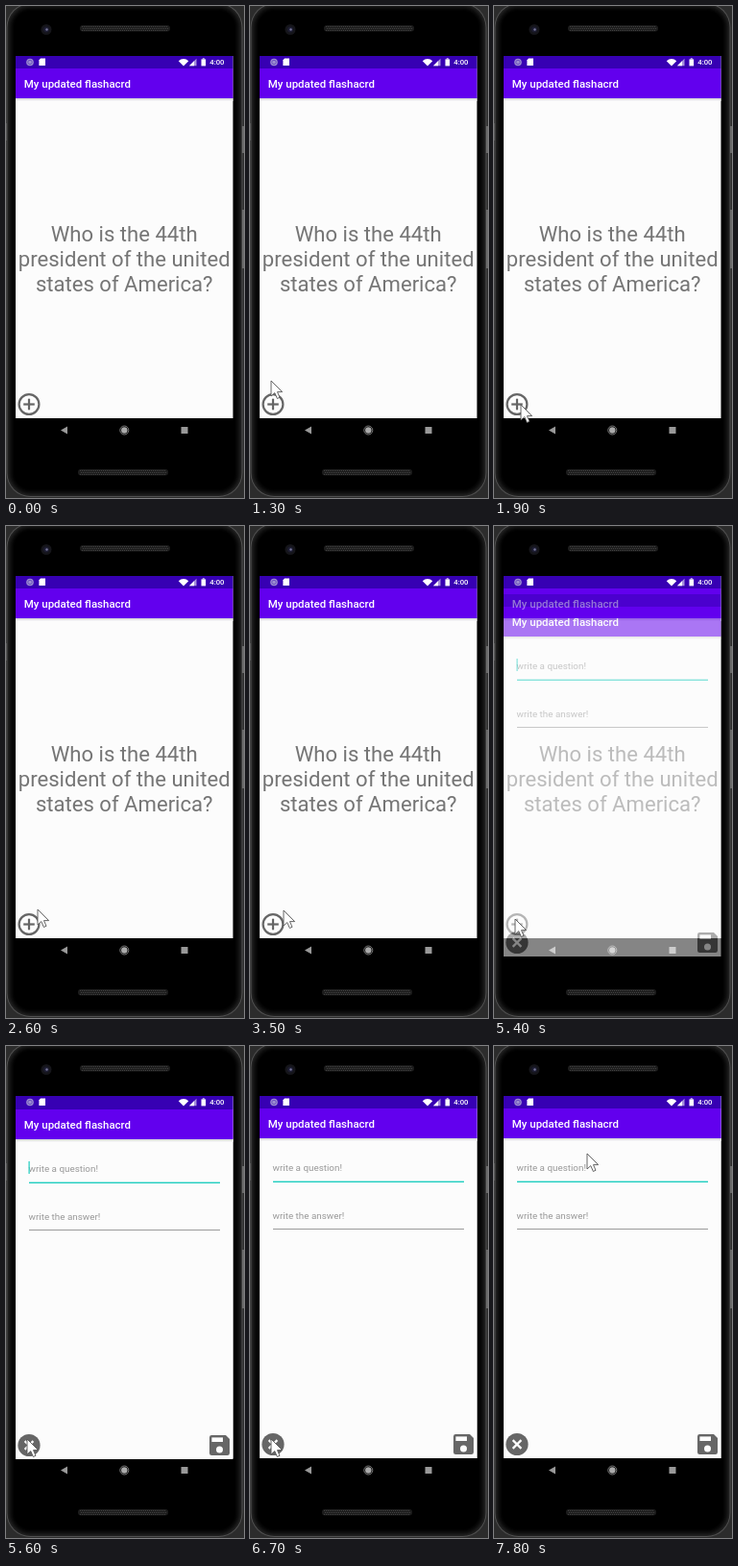
Write an HTML page with a canvas that moves like this. It is 248 px wide and 512 px high and loops after 8 s.

```html
<!DOCTYPE html>
<html lang="en">
<head>
<meta charset="utf-8">
<title>Flashcard app</title>
<style>
html, body { margin: 0; width: 100%; height: 100%; overflow: hidden; background: #000; }
canvas { display: block; width: 248px; height: 512px; }
</style>
</head>
<body>
<canvas id="stage" width="248" height="512"></canvas>
<script>
const W = 248, H = 512, LOOP = 8000, STEP = 100;
const SCREEN = { x: 10, y: 52, w: 226.5, h: 377 };
const GREY = '#666';
const stage = document.getElementById('stage').getContext('2d');

function makeLayer(paint) {
  const canvas = document.createElement('canvas');
  canvas.width = W;
  canvas.height = H;
  paint(canvas.getContext('2d'));
  return canvas;
}

function rect(c, x, y, w, h, color) {
  c.fillStyle = color;
  c.fillRect(x, y, w, h);
}

function disc(c, x, y, r, color) {
  c.fillStyle = color;
  c.beginPath();
  c.arc(x, y, r, 0, Math.PI * 2);
  c.fill();
}

function ring(c, x, y, r, width, color) {
  c.strokeStyle = color;
  c.lineWidth = width;
  c.beginPath();
  c.arc(x, y, r, 0, Math.PI * 2);
  c.stroke();
}

function pill(c, x, y, w, h, r, fill) {
  c.beginPath();
  c.roundRect(x, y, w, h, r);
  c.fillStyle = fill;
  c.fill();
}

function polygon(c, points, color) {
  c.beginPath();
  points.forEach(([x, y]) => c.lineTo(x, y));
  c.closePath();
  c.fillStyle = color;
  c.fill();
}

function line(c, x1, y1, x2, y2, width, color) {
  c.strokeStyle = color;
  c.lineWidth = width;
  c.beginPath();
  c.moveTo(x1, y1);
  c.lineTo(x2, y2);
  c.stroke();
}

function text(c, string, x, y, size, color, weight = 400, align = 'left') {
  c.font = `${weight} ${size}px Roboto, sans-serif`;
  c.textAlign = align;
  c.fillStyle = color;
  c.fillText(string, x, y);
}

function speaker(c, x, y) {
  pill(c, x, y, 94, 6.5, 3, '#1c1c1c');
  for (let row = 0; row < 3; row++) {
    for (let i = 0; i < 45; i++) rect(c, x + 2 + i * 2 + row % 2, y + 1 + row * 2, 1, 1, '#424242');
  }
}

function paintPhone(c) {
  rect(c, 0, 0, W, H, '#2c2c2c');
  // Rim shading fades inward to black
  pill(c, 0.5, -3, 246, 514, 25, '#505050');
  for (let inset = 1; inset <= 8; inset++) {
    const shade = Math.round(38 * (1 - inset / 8) ** 1.3);
    pill(c, 0.5 + inset, -3 + inset, 246 - inset * 2, 514 - inset * 2, 25 - inset, `rgb(${shade},${shade},${shade})`);
  }
  rect(c, 0, 122, 1, 18, '#555');
  rect(c, 246, 125, 2, 28, '#6a6a6a');
  rect(c, 246, 212, 2, 61, '#6a6a6a');
  speaker(c, 77, 20);
  speaker(c, 75, 482);
  disc(c, 42, 24.5, 5.5, '#15151a');
  disc(c, 42, 24.5, 3, '#1c1c30');
  disc(c, 42.5, 24.5, 1.2, '#77779a');

  rect(c, SCREEN.x, 429, SCREEN.w, 25, '#000');
  polygon(c, [[57, 441.5], [64, 437.5], [64, 445.5]], '#999');
  disc(c, 123.3, 441.5, 3.2, '#aaa');
  ring(c, 123.3, 441.5, 4.5, 0.8, '#999');
  rect(c, 182.5, 438, 7, 7, '#999');
}

function paintWindow(c) {
  rect(c, SCREEN.x, SCREEN.y, SCREEN.w, SCREEN.h, '#fcfcfc');
  rect(c, SCREEN.x, 52, SCREEN.w, 13, '#3700b3');
  rect(c, SCREEN.x, 65, SCREEN.w, 31, '#6200ee');
  const shadow = c.createLinearGradient(0, 96, 0, 99);
  shadow.addColorStop(0, '#cfcfd2');
  shadow.addColorStop(1, '#fcfcfc');
  rect(c, SCREEN.x, 96, SCREEN.w, 3, shadow);
  text(c, 'My updated flashacrd', 18.8, 85, 11.47, '#fff', 500);
}

function paintCard(c) {
  paintWindow(c);
  ['Who is the 44th', 'president of the united', 'states of America?'].forEach((row, i) =>
    text(c, row, 123.2, 245.2 + i * 25.9, 22.1, '#757575', 400, 'center'));
  ring(c, 24, 414.5, 10.4, 2.2, GREY);
  line(c, 18.2, 414.5, 29.8, 414.5, 2.2, GREY);
  line(c, 24, 408.7, 24, 420.3, 2.2, GREY);
}

function paintForm(c) {
  paintWindow(c);
  text(c, 'write a question!', 23.6, 130, 9.85, '#999');
  text(c, 'write the answer!', 23.6, 179.7, 9.85, '#999');
  rect(c, 24, 140.6, 199, 1.4, '#1fcdbf');
  rect(c, 24, 190, 199, 1, '#9b9b9b');
  disc(c, 24, 414.5, 11.6, GREY);
  line(c, 19.6, 410.1, 28.4, 418.9, 2.2, '#fcfcfc');
  line(c, 28.4, 410.1, 19.6, 418.9, 2.2, '#fcfcfc');

  pill(c, 212, 404, 21, 21, 2.3, GREY);
  polygon(c, [[228.5, 403.5], [233.5, 403.5], [233.5, 408.6]], '#fcfcfc');
  rect(c, 214.4, 406.4, 11.6, 4.6, '#fcfcfc');
  disc(c, 222.5, 419, 3.5, '#fcfcfc');
}

function paintStatus(c) {
  disc(c, 25, 58.5, 3.8, '#9d8fd0');
  ring(c, 25, 58.5, 2.2, 1, '#6b50c0');
  polygon(c, [[36, 54.5], [41, 54.5], [41, 62], [34.4, 62], [34.4, 56.2]], '#fff');
  c.beginPath();
  c.moveTo(185, 62.5);
  c.arc(185, 62.5, 7.4, -Math.PI * 0.75, -Math.PI * 0.25);
  c.fill();
  polygon(c, [[191, 62.2], [198.5, 62.2], [198.5, 54.8]], '#a994dd');
  polygon(c, [[191, 62.2], [196, 62.2], [196, 57.3]], '#fff');
  rect(c, 203.5, 55.4, 4.6, 7, '#fff');
  rect(c, 204.8, 54.4, 2, 1, '#fff');
  text(c, '4:00', 212.3, 61.4, 7.7, '#fff', 500);
}

const phone = makeLayer(paintPhone);

// Pointer stops: time, x, y
const pointerPath = [
  [500, 150, 345], [600, 65, 387], [700, 65, 387], [1000, 30, 386], [1300, 22, 390],
  [1600, 14, 412], [1650, 14, 412], [1900, 28, 415], [2100, 30, 400], [2300, 12, 397],
  [2400, 12, 397], [2600, 33, 399], [2700, 33, 399], [3100, 42, 396], [3200, 42, 396],
  [3700, 30, 402], [4100, 22, 409], [6900, 22, 409], [7100, 17, 392], [7400, 52, 250],
  [7600, 84, 150], [7800, 97, 112]
];

function pointerAt(t) {
  const next = pointerPath.findIndex(stop => stop[0] > t);
  if (next === 0) return null;
  if (next < 0) return pointerPath[pointerPath.length - 1].slice(1);
  const [t0, x0, y0] = pointerPath[next - 1];
  const [t1, x1, y1] = pointerPath[next];
  const k = (t - t0) / (t1 - t0);
  return [x0 + (x1 - x0) * k, y0 + (y1 - y0) * k];
}

function drawPointer(c, [x, y]) {
  c.save();
  c.translate(Math.round(x), Math.round(y));
  polygon(c, [[0, 0], [0, 16], [3.8, 12.6], [6.4, 18.5], [9, 17.3], [6.5, 11.6], [11.6, 11.6]], '#fff');
  c.strokeStyle = '#555';
  c.lineWidth = 0.9;
  c.stroke();
  c.restore();
}

function drawForm(c, t, form) {
  const progress = Math.min(1, (t - 5400) / 300);
  const dy = Math.round(19 * (1 - progress) ** 2.5);
  c.save();
  c.globalAlpha = Math.min(1, 0.53 + progress * 1.4);
  c.drawImage(form, 0, dy);
  const caretOn = Math.floor((t - 5200) / 500) % 2 === 0;
  if (caretOn) rect(c, 23.5, 119 + dy, 1.2, 13, '#1fcdbf');
  c.restore();
}

function draw(t) {
  stage.drawImage(phone, 0, 0);
  stage.drawImage(card, 0, 0);
  if (t >= 5400) drawForm(stage, t, form);
  paintStatus(stage);
  const pointer = pointerAt(t);
  if (pointer) drawPointer(stage, pointer);
}

const card = makeLayer(paintCard);
const form = makeLayer(paintForm);
const start = performance.now();

function tick() {
  const t = (performance.now() - start) % LOOP;
  draw(Math.floor(t / STEP) * STEP);
  requestAnimationFrame(tick);
}
tick();
</script>
</body>
</html>
```
